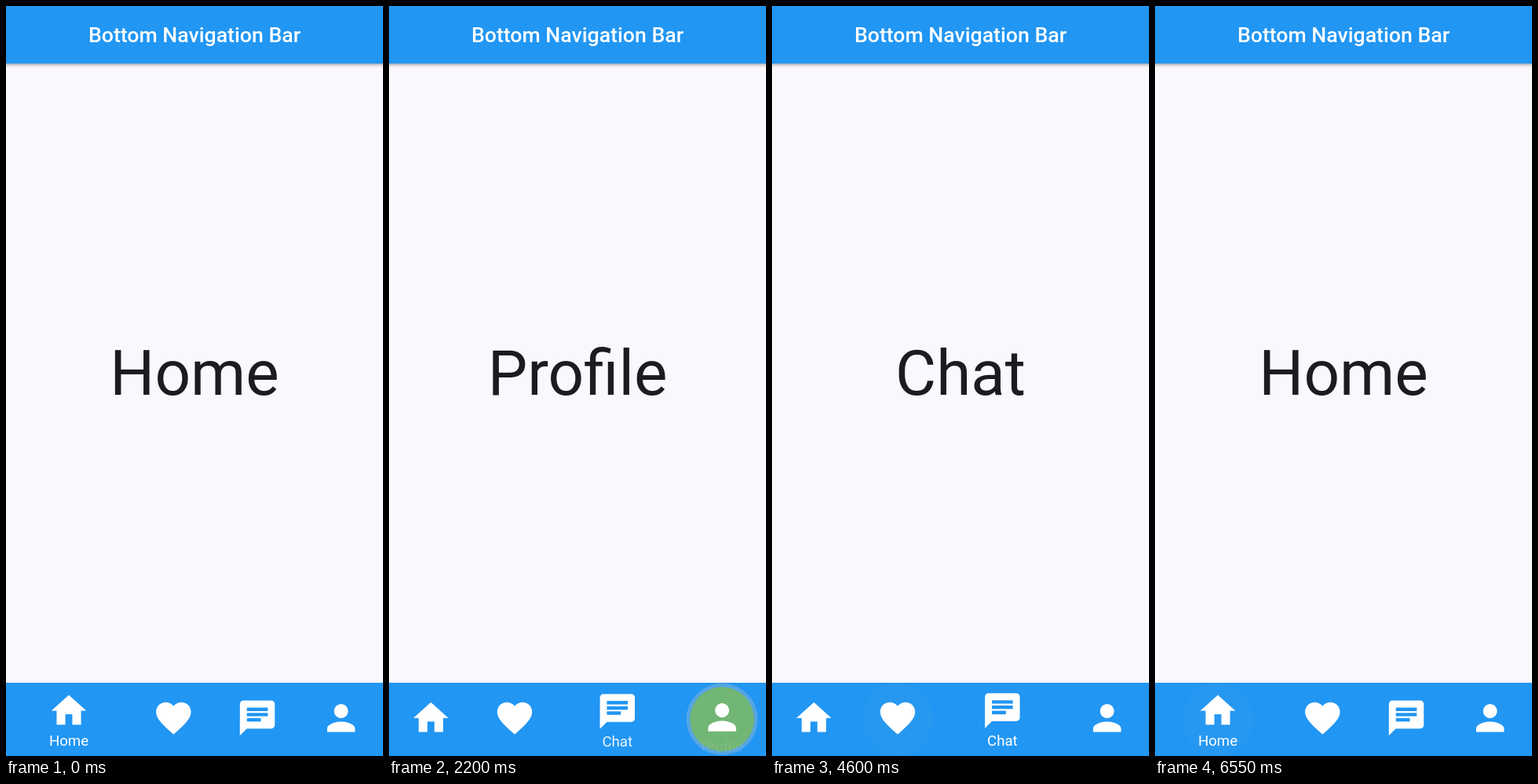
These frames come from a looping animation (480x953 px, 8000 ms). An HTML page:

```html
<!DOCTYPE html>
<html lang="en">
<head>
<meta charset="utf-8">
<title>Bottom Navigation Bar</title>
<style>
  html, body { margin: 0; width: 100%; height: 100%; overflow: hidden; background: #faf8fc; }
  svg { display: block; width: 100%; height: 100%; }
  text { font-family: Roboto, sans-serif; text-anchor: middle; }
</style>
</head>
<body>
<svg id="stage" viewBox="0 0 480 953">
  <defs>
    <linearGradient id="shade" x2="0" y2="1">
      <stop offset="0" stop-color="#000" stop-opacity=".32"/>
      <stop offset=".45" stop-color="#000" stop-opacity=".1"/>
      <stop offset="1" stop-color="#000" stop-opacity="0"/>
    </linearGradient>
    <clipPath id="barClip"><rect y="859.7" width="480" height="94"/></clipPath>
  </defs>
  <rect width="480" height="953" fill="#faf8fc"/>
  <rect y="73" width="480" height="6" fill="url(#shade)"/>
  <rect width="480" height="73" fill="#2196f3"/>
  <text x="240" y="46" font-size="26.67" font-weight="500" fill="#fff">Bottom Navigation Bar</text>
  <text id="page" x="240" y="494" font-size="80" fill="#1d1b20"></text>
  <g clip-path="url(#barClip)">
    <rect id="bar" y="859.7" width="480" height="94"/>
    <circle id="reveal" cy="906.3"/>
    <circle id="glow" cy="906.3" r="45.5" fill="#bcbcbc"/>
    <circle id="splash" cy="906.3" r="45.5" fill="#c8c8c8"/>
    <g id="items" fill="#fff"></g>
  </g>
</svg>
<script>
const LOOP = 8000, W = 480, BAR_MID = 46.7, SHIFT = 200;
const ICON = 40 / 18;

const tabs = [
  { name: 'Home', color: '#2196f3', icon: 'M10 20v-6h4v6h5v-8h3L12 3 2 12h3v8z' },
  { name: 'Feed', color: '#f44336', icon: 'M12 21.35l-1.45-1.32C5.4 15.36 2 12.28 2 8.5 2 5.42 4.42 3 7.5 3c1.74 0 3.41.81 4.5 2.09C13.09 3.81 14.76 3 16.5 3 19.58 3 22 5.42 22 8.5c0 3.78-3.4 6.86-8.55 11.54z' },
  { name: 'Chat', color: '#2196f3', icon: 'M20 2H4c-1.1 0-1.99.9-1.99 2L2 22l4-4h14c1.1 0 2-.9 2-2V4c0-1.1-.9-2-2-2zM6 9h12v2H6V9zm8 5H6v-2h8v2zm4-6H6V6h12v2z' },
  { name: 'Profile', color: '#4caf50', icon: 'M12 12c2.21 0 4-1.79 4-4s-1.79-4-4-4-4 1.79-4 4 1.79 4 4 4zm0 2c-2.67 0-8 1.34-8 4v2h16v-2c0-2.66-5.33-4-8-4z' }
];

// Each tap: finger down, selection, tab index.
const taps = [
  { down: 35, up: 165, tab: 1 },
  { down: 1185, up: 1367, tab: 2 },
  { down: 2010, up: 2166, tab: 3 },
  { down: 3495, up: 3567, tab: 2 },
  { down: 4588, up: 4690, tab: 1 },
  { down: 6050, up: 6141, tab: 0 }
];

const $ = id => document.getElementById(id);
const clamp = v => Math.min(1, Math.max(0, v));
const set = (el, attrs) => { for (const k in attrs) el.setAttribute(k, attrs[k]); };

function add(parent, tag, attrs) {
  const el = document.createElementNS('http://www.w3.org/2000/svg', tag);
  set(el, attrs);
  return parent.appendChild(el);
}

// cubic-bezier(.4, 0, .2, 1)
function ease(x) {
  if (x <= 0 || x >= 1) return clamp(x);
  let lo = 0, hi = 1, s;
  for (let i = 0; i < 24; i++) {
    s = (lo + hi) / 2;
    const bx = 1.2 * s * (1 - s) ** 2 + 0.6 * s * s * (1 - s) + s ** 3;
    if (bx < x) lo = s; else hi = s;
  }
  return s * s * (3 - 2 * s);
}

const page = $('page'), bar = $('bar'), reveal = $('reveal');
const glow = $('glow'), splash = $('splash');

for (const tab of tabs) {
  tab.art = add($('items'), 'path', { d: tab.icon, 'fill-rule': 'evenodd' });
  tab.label = add($('items'), 'text', { 'font-size': 18.67 });
  tab.label.textContent = tab.name;
}

function drawTouch(t, centers) {
  const tap = taps.filter(a => t >= a.down).pop();
  if (!tap) {
    set(glow, { opacity: 0 });
    set(splash, { opacity: 0 });
    return;
  }
  const held = clamp((Math.min(t, tap.up) - tap.down) / 200);
  const lit = clamp(held - Math.max(0, t - tap.up) / 200);
  const age = (t - tap.down) / 617;
  const wave = age < 0.4 ? clamp(age / 0.13) : clamp((1 - age) / 0.6);
  set(glow, { cx: centers[tap.tab], opacity: 0.4 * lit });
  set(splash, { cx: centers[tap.tab], opacity: 0.1 * wave });
}

function draw(t) {
  const done = taps.filter(a => t >= a.up);
  const last = done[done.length - 1];
  const now = last ? last.tab : 0;
  const before = done.length > 1 ? done[done.length - 2].tab : 0;
  const p = last ? ease((t - last.up) / SHIFT) : 1;

  const centers = [];
  let left = 0;
  tabs.forEach((tab, i) => {
    const on = i === now ? p : i === before ? 1 - p : 0;
    const width = (1 + 0.5 * on) * W / 4.5;
    const x = left + width / 2, drop = 9.33 * (1 - on);
    left += width;
    centers.push(x);
    set(tab.art, { transform: `translate(${x - 12 * ICON} ${868.8 + drop}) scale(${ICON})` });
    set(tab.label, { x, y: 940 + drop, opacity: on });
  });

  page.textContent = tabs[now].name;
  set(bar, { fill: tabs[p < 1 ? before : now].color });
  const x = centers[now];
  set(reveal, {
    cx: x,
    r: p < 1 ? p * Math.hypot(Math.max(x, W - x), BAR_MID) : 0,
    fill: tabs[now].color
  });
  drawTouch(t, centers);
}

const start = performance.now();
function tick() {
  draw((performance.now() - start) % LOOP);
  requestAnimationFrame(tick);
}
draw(0);
requestAnimationFrame(tick);
</script>
</body>
</html>
```
